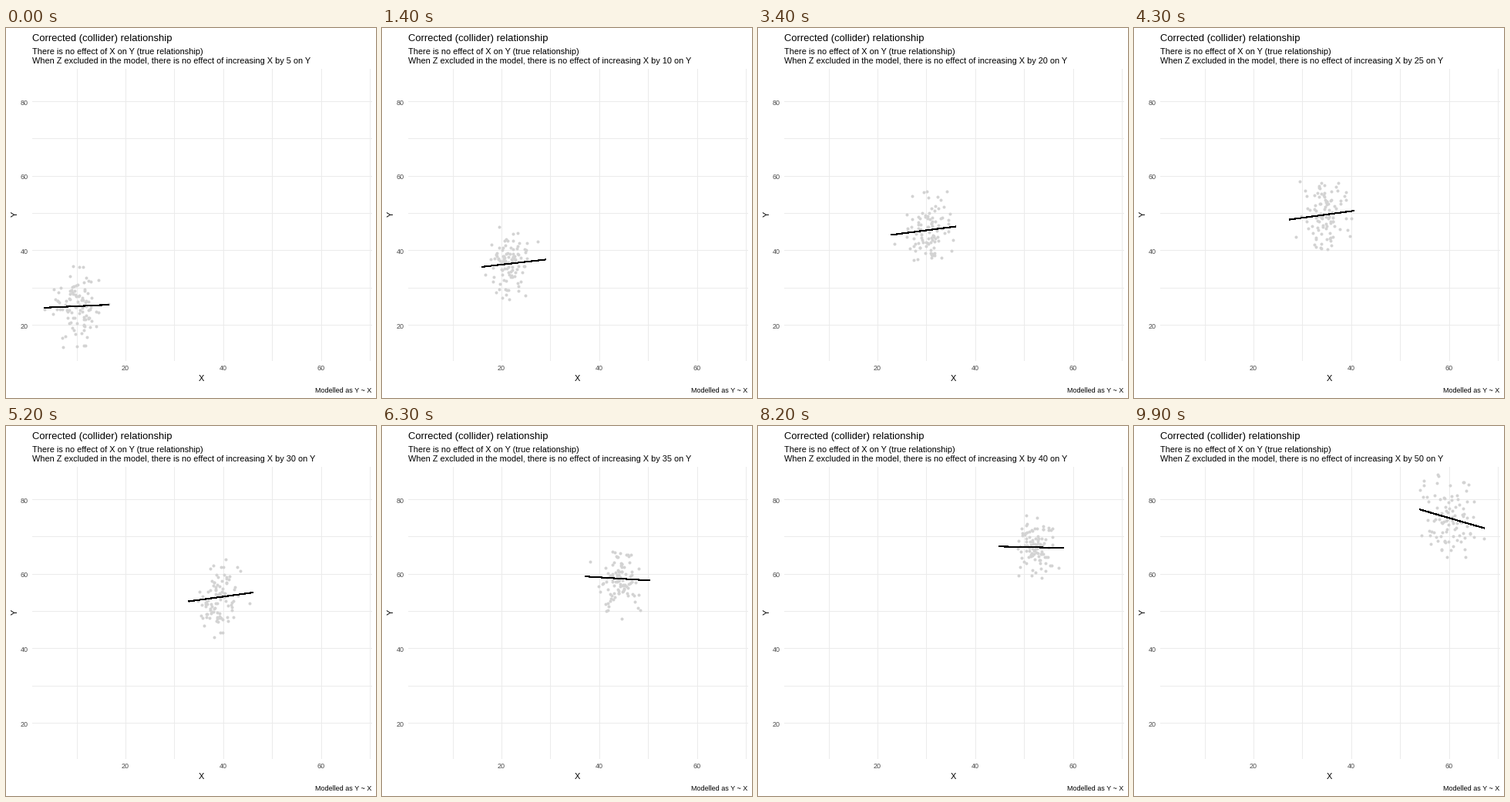
Write a matplotlib script that moves like this. It is 480 px wide and 480 px high and loops after 10 s.

```python
import numpy as np
import matplotlib.pyplot as plt
from matplotlib.animation import FuncAnimation

SIZE, DPI = 480, 72
STEPS, STATES, POINTS = 11, 10, 100
LEFT, RIGHT, TOP, BOTTOM = 34, 474, 53, 431
GRID, DOT, TICK = "#ebebeb", "#d3d3d3", "#4d4d4d"

SD_X, SD_Y, HALF = 2.5, 5, 6.6
# Per state: slope of the fit, and how far its midpoint sits from the mean of X
SLOPE = [.06, .18, .07, .17, .18, .18, -.18, -.22, .2, -.38]
LEAN = [0, 1.3, .8, -1.1, -.5, 1.4, -.4, -.2, -1.6, .6]

plt.rcParams["font.family"] = "Liberation Sans"


def px(x):
    return 28.25 + 6.34 * x


def py(y):
    return 481.76 - 4.833 * y


def make_state(k, rng):
    """Return the cloud of state k and the two ends of its fitted line."""
    mean = 15 + 5 * k if k else 10

    def line(x):
        return mean + 15 + SLOPE[k] * (x - mean)

    ends = mean + LEAN[k] + np.array([-HALF, HALF])
    x = np.clip(rng.normal(mean, SD_X, POINTS), *ends)
    x[[x.argmin(), x.argmax()]] = ends
    y = line(x) + SD_Y * np.clip(rng.standard_normal(POINTS), -2.15, 2.15)
    return np.array([px(x), py(y)]), np.array([px(ends), py(line(ends))])


rng = np.random.default_rng(12)
CLOUDS, FITS = zip(*(make_state(k, rng) for k in range(STATES)))

fig = plt.figure(figsize=(SIZE / DPI, SIZE / DPI), dpi=DPI, facecolor="white")
ax = fig.add_axes([0, 0, 1, 1])
ax.set(xlim=(0, SIZE), ylim=(SIZE, 0))
ax.axis("off")


def rule(xs, ys):
    ax.plot(xs, ys, color=GRID, lw=1, antialiased=False, zorder=1)


def label(x, y, text, size, color="black", **kw):
    return ax.text(x, y, text, size=size, color=color, va="baseline", **kw)


for v in range(10, 71, 10):
    rule([px(v)] * 2, [TOP, BOTTOM])
for v in range(20, 81, 10):
    rule([LEFT, RIGHT], [py(v)] * 2)
for v in (20, 40, 60):
    label(px(v), 444, str(v), 9, TICK, ha="center")
for v in (20, 40, 60, 80):
    label(29, py(v) + 4.6, str(v), 9, TICK, ha="right")

label(34, 17, "Corrected (collider) relationship", 13)
label(34, 34, "There is no effect of X on Y (true relationship)", 11)
subtitle = label(34, 46, "", 11)
label(253.5, 458, "X", 11, ha="center")
label(15, 241, "Y", 11, ha="center", rotation=90, rotation_mode="anchor")
label(474, 473, "Modelled as Y ~ X", 9, ha="right")

dots, = ax.plot([], [], "o", color=DOT, ms=4, mew=0, antialiased=False, zorder=2)
fit, = ax.plot([], [], color="black", lw=1.1, antialiased=False,
               solid_capstyle="butt", zorder=3)


def tween(states, pos):
    k = min(int(pos), STATES - 2)
    return states[k] + (states[k + 1] - states[k]) * (pos - k)


def update(frame):
    pos = frame / STEPS
    dots.set_data(*tween(CLOUDS, pos))
    fit.set_data(*tween(FITS, pos))
    amount = 5 * (round(pos) + 1)
    subtitle.set_text("When Z excluded in the model, there is no effect "
                      f"of increasing X by {amount} on Y")
    return dots, fit, subtitle


anim = FuncAnimation(fig, update, frames=100, interval=100,
                     repeat=True, repeat_delay=0)
plt.show()
```
